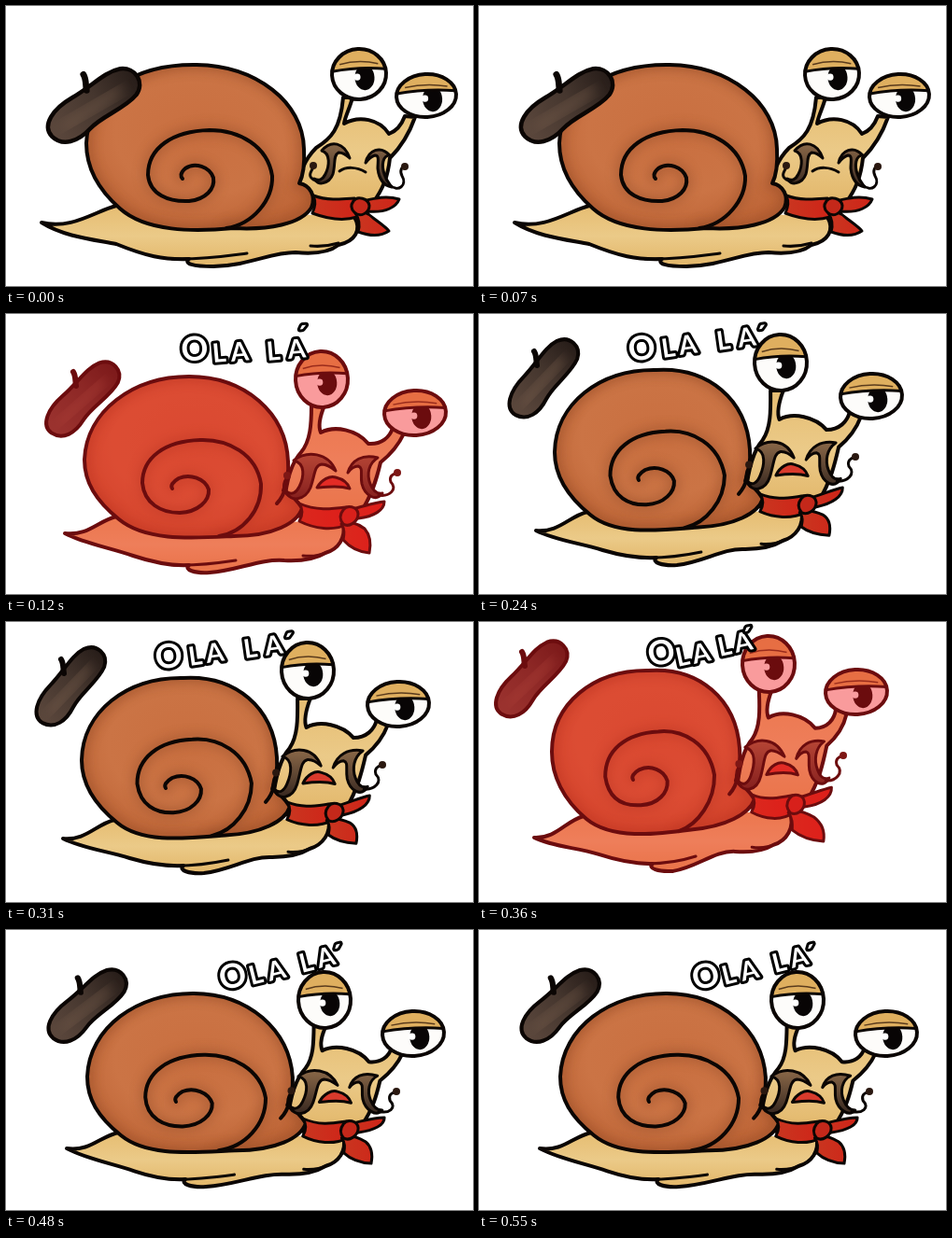
These frames come from a looping animation (500 by 300 pixels, 600 ms). An HTML page:

```html
<!DOCTYPE html>
<html lang="en">
<head>
<meta charset="utf-8">
<title>Snail with a beret</title>
<style>
  html, body { margin: 0; width: 100%; height: 100%; overflow: hidden; background: #fff; }
  svg { display: block; width: 500px; height: 300px; }
  .pose { visibility: hidden; animation: show 600ms step-end infinite; }
  @keyframes show { 0% { visibility: visible; } 20%, 100% { visibility: hidden; } }
  .line { fill: none; stroke: #0b0604; stroke-width: 4; stroke-linecap: round; stroke-linejoin: round; }
  .thin { stroke-width: 3; }
  .soft { filter: url(#blur); fill: none; stroke-linecap: round; }
  .word {
    font: 700 28px Lato, "Open Sans", sans-serif; text-anchor: middle;
    fill: #fff; stroke: #000; stroke-width: 6; stroke-linejoin: round; paint-order: stroke;
  }
  .word .big { font-size: 36px; }
</style>
</head>
<body>
<svg viewBox="0 0 500 300" role="img" aria-label="Snail saying OLA LÁ">
  <defs>
    <filter id="blur" x="-50%" y="-50%" width="200%" height="200%"><feGaussianBlur stdDeviation="6"/></filter>
    <filter id="red" x="0" y="0" width="500" height="300" filterUnits="userSpaceOnUse" color-interpolation-filters="sRGB">
      <feColorMatrix values=".58 0 0 0 .4  0 .58 0 0 .035  0 0 .58 0 .045  0 0 0 1 0"/>
    </filter>
    <radialGradient id="shell" cx=".5" cy=".42" r=".62">
      <stop offset="0" stop-color="#c96f40"/><stop offset=".6" stop-color="#cb7445"/><stop offset="1" stop-color="#bd6436"/>
    </radialGradient>
    <linearGradient id="skin" x2="0" y2="1">
      <stop offset="0" stop-color="#e6bd72"/><stop offset=".5" stop-color="#ebca88"/><stop offset="1" stop-color="#e2b669"/>
    </linearGradient>
    <linearGradient id="scarf"><stop offset="0" stop-color="#c93620"/><stop offset="1" stop-color="#cf2418"/></linearGradient>
    <linearGradient id="beret">
      <stop offset="0" stop-color="#5c483d"/><stop offset=".55" stop-color="#45362e"/><stop offset="1" stop-color="#261c18"/>
    </linearGradient>
    <linearGradient id="hair" x2="0" y2="1"><stop offset="0" stop-color="#8a6848"/><stop offset="1" stop-color="#382820"/></linearGradient>
  </defs>
  <g id="stage"></g>
</svg>
<script>
const resting = {
  head: 'M312 200 C314 178 320 164 332 152 C348 142 358 132 361 98 L371 98 C368 110 363 118 362 126 C378 117 400 121 410 137 C418 134 424 126 427 118 L438 119 C432 136 424 150 411 163 C409 182 404 196 392 212 L330 214Z',
  body: 'M118 214 C95 220 70 240 38 232 C62 247 92 250 118 255 C150 268 168 272 196 271 C190 276 200 279 222 279 C262 278 282 264 310 264 C330 266 346 264 356 256 C374 252 381 240 373 226',
  belly: 'M178 271 C210 272 235 268 258 265 M326 257 C336 258 346 257 356 254',
  shell: 'M122 217 C98 196 86 172 86 147 C88 94 138 62 204 63 C268 64 318 103 319 153 C320 170 318 182 314 190 C326 192 332 204 327 216 C316 234 280 240 244 238 C200 242 150 242 122 217Z',
  spiral: 'M236 238 C264 234 286 208 285 182 C280 150 250 133 218 133 C178 134 152 152 152 181 C154 202 174 210 196 209 C214 207 224 196 222 184 C218 172 202 167 192 174 C186 179 187 183 189 185',
  edge: '',
  band: 'M329 203 C345 209 360 207 373 206 L376 226 C360 231 344 228 328 222 C331 215 332 210 329 203Z',
  tails: 'M382 209 C395 206 407 203 421 207 C418 215 407 222 387 220Z M374 222 C380 218 388 222 393 227 C401 233 408 238 410 241 C400 248 388 246 377 242 C379 235 379 229 374 222Z',
  knot: 'M372 209 C376 203 388 206 389 214 C389 222 379 227 373 221 C369 217 369 213 372 209Z',
  hair: 'M368 163 C362 146 348 143 338 155 C348 158 346 172 342 180 C339 186 335 188 330 185 C333 193 346 191 350 180 C353 170 350 160 356 157 C361 157 365 160 368 163Z M385 168 C388 154 401 149 411 160 C403 160 402 171 405 180 C407 187 410 190 413 194 C403 192 399 183 398 174 C398 166 400 160 395 160 C391 161 388 164 385 168Z',
  curls: 'M332 187 C322 184 326 178 329 173 M411 192 C420 200 430 192 424 182 C421 176 424 172 427 172',
  balls: [[329, 171], [427, 172]],
  mouth: 'M357 177 C364 172 375 172 385 178',
  eyes: [[378, 73, 29, 27], [450, 96, 32, 23]]
};

const singing = {
  head: 'M298 204 C300 178 305 160 316 148 C326 136 327 118 327 98 L341 98 C336 110 334 120 337 127 C352 119 376 124 388 139 C402 140 411 132 414 122 L426 128 C420 141 411 151 401 159 C397 176 392 194 380 212 L316 218Z',
  body: 'M118 217 C98 222 88 238 63 235 C84 246 110 250 136 259 C160 267 178 270 196 269 C190 274 202 278 218 277 C248 275 272 262 298 264 C318 265 332 262 342 256 C356 252 364 240 361 224',
  belly: 'M180 269 C204 270 226 267 246 264 M318 259 C328 260 336 259 344 255',
  shell: 'M121 220 C96 200 84 180 84 156 C86 104 136 67 196 67 C256 67 300 106 302 158 C303 170 301 180 297 189 C306 194 312 200 317 208 C312 224 286 238 244 238 C200 240 150 244 121 220Z',
  spiral: 'M228 238 C254 234 274 210 273 182 C268 150 238 134 208 135 C170 136 146 154 146 181 C148 203 166 213 186 213 C206 212 218 200 217 188 C213 176 197 171 185 176 C178 180 176 184 178 187',
  edge: 'M300 184 C298 191 295 198 290 203',
  band: 'M314 203 C332 211 348 209 364 207 L366 225 C350 233 330 230 314 222 C318 215 318 209 314 203Z',
  tails: 'M371 209 C384 206 394 202 405 201 C405 210 394 217 377 219Z M359 225 C366 221 376 224 384 230 C390 237 391 246 389 256 C378 255 368 250 361 242 C362 236 363 231 359 225Z',
  knot: 'M361 210 C365 204 376 206 377 214 C377 223 367 229 361 225 C357 220 357 215 361 210Z',
  hair: 'M353 168 C345 148 322 146 308 157 C321 160 319 175 314 185 C311 191 306 195 300 190 C304 202 320 200 326 186 C331 172 330 162 338 161 C344 161 348 164 353 168Z M366 170 C370 156 382 150 398 154 C388 160 386 172 390 182 C393 190 397 193 403 192 C396 202 384 194 381 182 C379 172 383 165 377 163 C372 163 369 166 366 170Z',
  curls: 'M303 195 C295 189 297 180 301 175 M399 194 C410 196 420 188 412 180 C410 174 414 171 418 171',
  balls: [[301, 173], [419, 170]],
  mouth: 'M333 186 C338 177 347 173 353 175 C361 177 366 181 368 187 C357 184 346 185 333 186Z',
  eyes: [[338, 70, 28, 30], [438, 106, 33, 24]]
};

// Anchor point, then its shift in the three later singing poses
const anchors = [
  [63, 236, -2, -3, -4, -4, 2, -1],
  [84, 158, -3, -8, -6, -17, 3, 1],
  [195, 67, -7, -7, -15, -15, 5, 1],
  [180, 184, -7, -9, -13, -18, 4, -3],
  [273, 180, -10, -9, -21, -18, 5, -2],
  [302, 150, -12, -13, -23, -23, 5, 0],
  [118, 217, -2, -5, -6, -9, 2, 0],
  [205, 277, -6, -8, -10, -10, -4, -2],
  [315, 209, -13, -10, -22, -18, 4, -1],
  [369, 214, -16, -12, -29, -21, 0, -2],
  [350, 182, -16, -14, -26, -24, 2, -2],
  [338, 70, -15, -18, -28, -25, 3, 5],
  [358, 124, -16, -14, -28, -25, 1, 3],
  [438, 106, -18, -18, -34, -31, -2, 5],
  [419, 170, -16, -17, -29, -27, -1, 3],
  [388, 255, -14, -19, -20, -21, 2, -6],
  [345, 258, -17, -13, -27, -17, 0, -3]
];

// Beret: x, y, angle, scale. Word: angle, then x and baseline per character.
const poses = [
  { art: resting, beret: [93, 105, -30, 1.13] },
  { art: singing, red: true, beret: [81, 90, -41, 1], turn: -5,
    x: [203, 229, 251, 270, 287, 312, 318], y: [51, 52, 51, 50, 50, 48, 33] },
  { art: singing, shift: 2, beret: [68, 68, -46, 1], turn: -8,
    x: [176, 204, 225, 245, 263, 288, 304], y: [51, 47, 44, 42, 39, 36, 33] },
  { art: singing, shift: 4, red: true, beret: [55, 60, -43, 1], turn: -12,
    x: [198, 220, 240, 253, 265, 285, 290], y: [48, 48, 45, 41, 37, 33, 27] },
  { art: singing, shift: 6, beret: [86, 80, -37, 1.02], turn: -14,
    x: [246, 270, 292, 308, 324, 345, 358], y: [65, 59, 55, 50, 46, 41, 37] }
];

// Moves a point by the distance-weighted shifts of the anchors
function warp(x, y, k) {
  if (!k) return [x, y];
  let sum = 0, dx = 0, dy = 0;
  for (const a of anchors) {
    const w = 1 / ((x - a[0]) ** 2 + (y - a[1]) ** 2 + 120) ** 1.6;
    sum += w;
    dx += w * a[k];
    dy += w * a[k + 1];
  }
  return [x + dx / sum, y + dy / sum].map(v => +v.toFixed(1));
}

const fill = (d, color) => `<path d="${d}" fill="${color}"/>`;
const line = (d, extra = '') => `<path class="line ${extra}" d="${d}"/>`;
const inked = (d, color, extra) => fill(d, color) + line(d, extra);
const soft = (d, color, width, alpha) =>
  `<path class="soft" d="${d}" stroke="${color}" stroke-width="${width}" opacity="${alpha}"/>`;

function eye(x, y, rx, ry) {
  const k = ry * 0.16, lx = rx * Math.sqrt(1 - 0.16 ** 2);
  const rim = `rx="${rx}" ry="${ry}"`;
  return `<g transform="translate(${x} ${y}) rotate(-3)">
    <ellipse ${rim} fill="#fdfcfa"/>
    <ellipse cx="${rx * 0.2}" cy="4" rx="10.5" ry="13.5" fill="#080505"/>
    <circle cx="${rx * 0.2 - 8}" cy="3" r="3.6" fill="#fff"/>
    ${fill(`M${-lx} ${-k} A${rx} ${ry} 0 0 1 ${lx} ${-k} Q0 ${-k - 4} ${-lx} ${-k}Z`, '#dfaf5f')}
    ${line(`M${-lx} ${-k} Q0 ${-k - 4} ${lx} ${-k}`, 'thin')}
    <path d="M${-rx * 0.7} ${-ry * 0.42} Q0 ${-ry * 0.6} ${rx * 0.72} ${-ry * 0.38}" fill="none" stroke="#5a3b1c" stroke-width="1.5"/>
    <ellipse class="line" ${rim}/></g>`;
}

function beret([x, y, angle, scale]) {
  const d = 'M-49 7 C-52 -7 -35 -15 -14 -15 C8 -15 24 -21 39 -16 C53 -10 53 7 40 13 C24 19 2 14 -14 19 C-30 24 -45 21 -49 7Z';
  return `<g transform="translate(${x} ${y}) scale(${scale})">
    <g transform="rotate(${angle})">${inked(d, 'url(#beret)')}${soft('M-32 6 C-10 2 10 4 26 0', '#7d6250', 9, 0.55)}</g>
    <path class="line" style="stroke-width:6" d="M-6 -13 C-7 -18 -6 -23 -9 -28"/></g>`;
}

function draw({ art, shift, beret: hat, red, turn, x, y }, i) {
  const at = (px, py) => warp(px, py, shift);
  const p = {};
  for (const key in art) {
    if (typeof art[key] === 'string')
      p[key] = art[key].replace(/(\d+) (\d+)/g, (_, a, b) => at(+a, +b).join(' '));
  }
  const balls = art.balls.map(b => at(...b)).map(([cx, cy]) => `<circle cx="${cx}" cy="${cy}" r="4" fill="#2a1810"/>`).join('');
  const eyes = art.eyes.map(([cx, cy, rx, ry]) => eye(...at(cx, cy), rx, ry)).join('');
  const mouth = art === resting ? line(p.mouth, 'thin') : inked(p.mouth, '#d83a2c', 'thin');
  const word = x ? `<text class="word" x="${x.join(' ')}" y="${y.join(' ')}" rotate="${turn}"><tspan class="big">O</tspan>LA LA´</text>` : '';

  return `<g class="pose" style="animation-delay:${i * 120 - 600}ms">
    <g ${red ? 'filter="url(#red)"' : ''}>
      ${inked(p.head, 'url(#skin)')}
      ${fill(p.body, 'url(#skin)')}${line(p.body)}${line(p.belly, 'thin')}
      <clipPath id="in${i}"><path d="${p.shell}"/></clipPath>
      ${fill(p.shell, 'url(#shell)')}
      <g clip-path="url(#in${i})">
        ${soft(p.shell, '#8a4524', 12, 0.45)}
        ${soft(p.spiral, '#8f4826', 12, 0.4)}
      </g>
      ${line(p.shell)}${line(p.spiral)}${line(p.edge)}
      ${inked(p.band, 'url(#scarf)', 'thin')}${inked(p.tails, 'url(#scarf)', 'thin')}${inked(p.knot, '#c4281a', 'thin')}
      ${mouth}${inked(p.hair, 'url(#hair)', 'thin')}${line(p.curls, 'thin')}${balls}
      ${eyes}${beret(hat)}
    </g>${word}</g>`;
}

document.getElementById('stage').innerHTML = poses.map(draw).join('');
</script>
</body>
</html>
```
